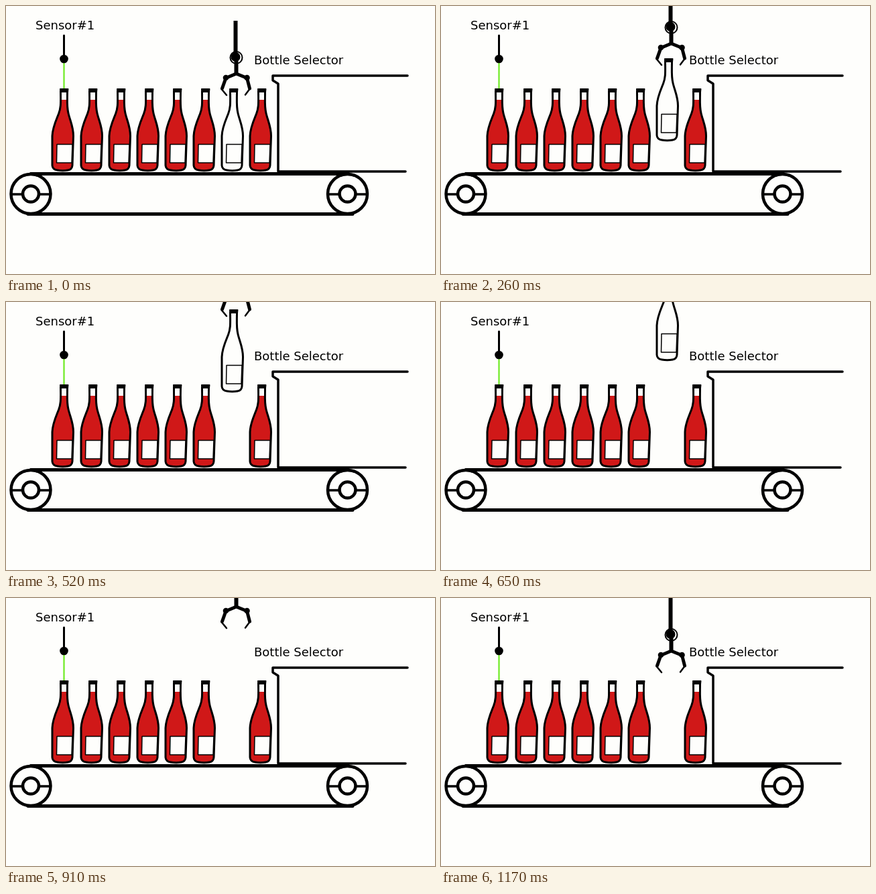
These frames come from a looping animation (640x400 px, 2080 ms). An HTML page:

```html
<!DOCTYPE html>
<html lang="en">
<head>
<meta charset="utf-8">
<title>Bottle selector</title>
<style>
  html, body { margin: 0; width: 100%; height: 100%; overflow: hidden; background: #fefefc; }
  svg { display: block; width: 640px; height: 400px; }
  text { font: 18px "DejaVu Sans", Verdana, sans-serif; }
  .line { fill: none; stroke: #000; stroke-linecap: round; stroke-linejoin: round; }
</style>
</head>
<body>
<svg viewBox="0 0 640 400">
  <defs>
    <!-- Bottle, x = 0 on the axis of the cap -->
    <g id="bottle" stroke="#000" stroke-linejoin="round">
      <path stroke-width="3" d="M-5 127 C-5 142 -4 151 -8 161 C-12 171 -17 181 -17.5 194 L-17.5 238 Q-17 244 -10 245 Q-2 246.500 6 245 Q12 244 12.500 238 L14 194 C14 180 9 171 6.500 160 C4 150 5 142 5 127 Z"/>
      <path fill="#fefefc" stroke-width="1.500" d="M-10.500 206.500 L12.500 206.500 L11.500 234 L-11 234 Z"/>
      <path fill="#000" stroke-width="1" d="M-6 123.500 H6.500 L6 128.500 H-5.500 Z"/>
    </g>
    <g id="full">
      <use href="#bottle" fill="#d01818"/>
      <path fill="#fefefc" d="M-3.500 129 H3.500 V140 H-3.500 Z"/>
    </g>
    <g id="wheel" class="line">
      <circle r="29.500" stroke-width="4.500"/>
      <circle r="12" stroke-width="4.500"/>
      <path stroke-width="3.500" d="M-29 .5 H-13 M13 .5 H29"/>
    </g>
  </defs>

  <path stroke="#7cec38" stroke-width="2.500" d="M86.500 84 V123"/>
  <g id="row"></g>

  <path class="line" stroke-width="5" d="M37 250.500 H511 M33 310.500 H517"/>
  <use href="#wheel" x="37" y="280.500"/>
  <use href="#wheel" x="509.500" y="280.500"/>

  <path class="line" stroke-width="3.500" d="M599 104 H398 V111 L406 116 V247 H596"/>

  <path class="line" stroke-width="3" d="M86.500 44 V79"/>
  <circle cx="86.500" cy="79" r="6.300"/>
  <text x="44" y="35">Sensor#1</text>
  <text x="370" y="87">Bottle Selector</text>

  <g id="lift">
    <use id="empty" href="#bottle" x="339.500" fill="#fefefc"/>
    <path stroke="#000" stroke-width="6" d="M342.500 22 V77 M343.500 77 V102"/>
    <circle cx="342.500" cy="76" r="7"/>
    <circle class="line" cx="343.500" cy="77" r="9" stroke-width="2"/>
    <path class="line" stroke-width="5" d="M322.500 123 L328 107.500 L343.500 101 L359.500 107.500 L363.500 123"/>
    <circle cx="328" cy="107" r="4.300"/>
    <circle cx="359.500" cy="107" r="4.300"/>
    <path class="line" stroke-width="2.500" d="M322 124.500 L329 133 M363 124.500 L357 132.500"/>
  </g>
</svg>
<script>
  const STEP = 130, LOOP = 2080;
  const heights = [0, 15, 45, 66, 112, 159, 121, 88, 55, 22];
  const RELEASE = 6; // from this step on the claw is empty

  const lift = document.getElementById("lift");
  const empty = document.getElementById("empty");

  const bottles = [86.5, 129.5, 171.5, 213.5, 255.5, 297.5, 381.5];
  document.getElementById("row").innerHTML =
    bottles.map(x => `<use href="#full" x="${x}"/>`).join("");

  const start = performance.now();

  function draw() {
    const time = (performance.now() - start) % LOOP;
    const step = Math.min(Math.floor(time / STEP), heights.length - 1);
    lift.setAttribute("transform", `translate(0 ${-heights[step]})`);
    empty.setAttribute("visibility", step < RELEASE ? "visible" : "hidden");
    requestAnimationFrame(draw);
  }
  draw();
</script>
</body>
</html>
```
